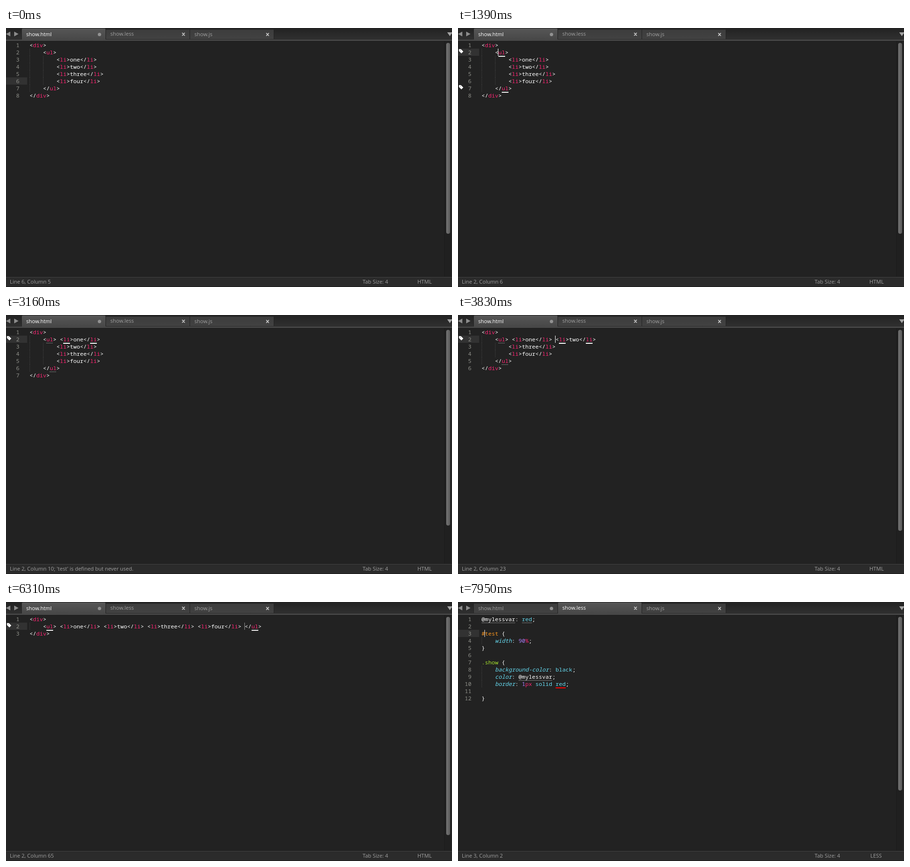
An HTML page that plays this animation: 928x540 px, repeating every 8 s.

```html
<!DOCTYPE html>
<html lang="en">
<head>
<meta charset="utf-8">
<title>Joining lines in an editor</title>
<style>
  html, body { margin: 0; width: 100%; height: 100%; overflow: hidden; background: #222; }
  #stage { position: relative; width: 928px; height: 540px; overflow: hidden; background: #222;
    font: 11px/15px "Open Sans", "Noto Sans", sans-serif; color: #a0a0a0; }
  #stage div { position: absolute; white-space: pre; }
  #chrome { position: absolute; left: 0; top: 0; }
  .tab { z-index: 1; }
  #stage .tab.on { color: #fff; }
  #code { left: 0; top: 28px; width: 912px; height: 490px; }
  #stage #code { color: #fff; font: 11.6667px/15px "Noto Sans Mono", "DejaVu Sans Mono", monospace; }
  .num { left: 0; width: 28px; text-align: right; color: #8f908a; }
  .row { left: 49px; }
  .here { left: 0; width: 44px; height: 15px; background: #323232; }
  .guide { width: 1px; height: 15px;
    background: repeating-linear-gradient(#444 0 1px, transparent 1px 2px); }
  .caret { width: 1px; height: 15px; background: #fff; }
  .dots { height: 1px; background: repeating-linear-gradient(90deg, #bbb 0 1px, transparent 1px 2px); }
  .tag { left: 2px; width: 9px; height: 9px; background: #fff;
    clip-path: polygon(0 0, 4px 0, 9px 5px, 5px 9px, 0 4px); }
  .tag::after { content: ""; position: absolute; left: 1.5px; top: 1.5px; width: 1.5px; height: 1.5px; background: #222; }
  .t { color: #f92672; } .c { color: #66d9ef; } .p { color: #66d9ef; font-style: italic; }
  .n { color: #ae81ff; } .o { color: #fd971f; } .g { color: #a6e22e; }
  #thumb { left: 916px; top: 31px; width: 8px; border-radius: 4px;
    background: linear-gradient(90deg, #747474, #5c5c5c); }
</style>
</head>
<body>
<div id="stage">
  <svg id="chrome" width="928" height="540">
    <defs>
      <linearGradient id="bar" x2="0" y2="1"><stop stop-color="#222"/><stop offset="1" stop-color="#303030"/></linearGradient>
      <linearGradient id="off" x2="0" y2="1"><stop stop-color="#3c3c3c"/><stop offset="1" stop-color="#424242"/></linearGradient>
      <linearGradient id="lit" x2="0" y2="1"><stop stop-color="#565656"/><stop offset="1" stop-color="#464646"/></linearGradient>
    </defs>
    <rect width="928" height="24" fill="url(#bar)"/>
    <rect y="23" width="928" height="4" fill="#464646"/>
    <rect y="23" width="928" height="1" fill="#2a2a2a"/>
    <rect y="27" width="928" height="1" fill="#1b1b1b"/>
    <g id="tabs"></g>
    <g fill="#8c8c8c">
      <path d="M0 12.5l9-5v10zM26 12.5l-9-5v10z"/>
      <path d="M918 9h11l-5.500 8z" fill="#a4a4a4"/>
      <circle cx="194.500" cy="13.500" r="3.500" fill="#929292"/>
    </g>
    <path d="M366.500 10l5.500 6m0-6l-5.500 6M541.500 10.500l5.500 6m0-6l-5.500 6" stroke="#ccc" stroke-width="1.800"/>
    <rect x="912" y="28" width="14" height="490" fill="#202020"/>
    <path d="M912.500 28v490" stroke="#1b1b1b"/>
    <path d="M926.500 28v490" stroke="#2c2c2c"/>
    <rect y="518" width="928" height="22" fill="#2b2b2b"/>
    <path d="M0 518.500h928M0 539.500h928" stroke="#1b1b1b"/>
    <path d="M0 519.500h928" stroke="#454545"/>
  </svg>
  <div class="tab" style="left:42px;top:5px">show.html</div>
  <div class="tab" style="left:217px;top:4px">show.less</div>
  <div class="tab" style="left:392px;top:5px">show.js</div>
  <div id="code"></div>
  <div id="thumb"></div>
  <div id="status" style="left:8px;top:521px"></div>
  <div style="left:742px;top:521px">Tab Size: 4</div>
  <div id="lang" style="top:521px"></div>
</div>
<script>
const LOOP = 8000, ROW = 15, COL = 7;
const $ = id => document.getElementById(id);
const words = ["one", "two", "three", "four"];

// time, joined lines (-1: stylesheet), caret line, column, caret opacity, marked tag
const steps = [
  [0, 0, 6, 5, 0, ""],
  [410, 0, 5, 5, 1, ""],
  [550, 0, 4, 5, 1, ""],
  [680, 0, 3, 5, 1, ""],
  [830, 0, 2, 5, 1, "ul"],
  [1240, 0, 2, 5, .5, "ul"],
  [1390, 0, 2, 6, 1, "ul"],
  [1670, 0, 2, 7, 1, "ul"],
  [2060, 0, 2, 7, .5, "ul"],
  [2200, 0, 2, 7, 0, "ul"],
  [2610, 1, 2, 10, 1, "ul"],
  [2890, 1, 2, 10, 1, "one"],
  [3020, 1, 2, 10, .5, "one"],
  [3160, 1, 2, 10, 0, "one"],
  [3680, 2, 2, 23, 1, "one"],
  [3820, 2, 2, 23, 1, "two"],
  [3950, 3, 2, 36, 1, "three"],
  [4250, 4, 2, 51, 1, "four"],
  [4540, 4, 2, 51, .5, "four"],
  [4690, 4, 2, 51, 0, "four"],
  [5230, 4, 2, 51, .5, "four"],
  [5360, 4, 2, 51, 1, "four"],
  [5640, 4, 2, 51, .5, "four"],
  [5750, 4, 2, 51, 0, "four"],
  [5880, 5, 2, 65, 1, "four"],
  [6310, 5, 2, 65, .5, "ul"],
  [6460, 5, 2, 65, .25, "ul"],
  [6580, 5, 2, 65, 0, "ul"],
  [6980, 5, 2, 65, 1, "ul"],
  [7400, 5, 2, 65, 0, "ul"],
  [7670, -1, 3, 2, 1, ""],
  [7950, -1, 3, 2, .85, ""]
];

// [x:text] marks a run of colour class x
const less = [
  "@mylessvar: [c:red];", "", "[o:#test] {", "    [p:width]: [n:90][t:%];", "}", "",
  "[g:.show] {", "    [p:background-color]: [c:black];", "    [p:color]: @mylessvar;",
  "    [p:border]: [n:1][t:px] [c:solid] [c:red];", "", "}"
];

function markup(joins) {
  const parts = ["<ul>", ...words.map(w => `<li>${w}</li>`), "</ul>"];
  const rest = parts.slice(joins + 1).map(p => (p === "</ul>" ? "    " : "        ") + p);
  return ["<div>", "    " + parts.slice(0, joins + 1).join(" "), ...rest, "</div>"];
}

const paintHtml = s => s.replace(/<(\/?)(\w+)>/g, '&lt;$1<span class="t">$2</span>&gt;');
const paintLess = s => s.replace(/\[(\w):([^\]]+)\]/g, '<span class="$1">$2</span>');
const box = (cls, css, text = "") => `<div class="${cls}" style="${css}">${text}</div>`;
const under = (row, col, len) =>
  `left:${49 + col * COL}px;top:${(row + 1) * ROW}px;width:${len * COL}px;`;
const line = (row, col, len, h, color) =>
  box("", under(row, col, len) + `height:${h}px;background:${color}`);

// row and column of both names of a tag pair
function ends(rows, name) {
  const find = (s, skip) => {
    const r = rows.findIndex(x => x.includes(s));
    return [r, rows[r].indexOf(s) + skip];
  };
  if (name === "ul") return [find("<ul>", 1), find("</ul>", 2)];
  const open = `<li>${name}`;
  return [find(open, 1), find(open + "</li>", open.length + 2)];
}

function marks(rows, name) {
  if (!name) return "";
  const spots = ends(rows, name);
  let out = spots.map(([r, c]) => line(r, c, 2, 2, "#fff")).join("");
  out += ends(rows, "ul").map(([r, c]) => box("dots", under(r, c, 2))).join("");
  for (const r of new Set(spots.map(s => s[0]))) out += box("tag", `top:${r * ROW + 1}px`);
  return out;
}

function drawTabs(active) {
  $("tabs").innerHTML = [0, 1, 2].map(i => {
    const x = 33 + i * 175, on = i === active, base = on ? 27 : 23;
    return `<path d="M${x} ${base}V3q0-2 2-2h170q2 0 2 2V${base}z" fill="url(#${on ? "lit" : "off"})"/>` +
      `<path d="M${x - .5} 3v20M${x + 174.5} 3v20" stroke="#222"/>` +
      (on ? "" : `<path d="M${x} 2h174" stroke="#242424" stroke-width="3"/>`);
  }).join("");
  document.querySelectorAll(".tab").forEach((t, i) => t.classList.toggle("on", i === active));
}

function draw([, joins, row, col, alpha, name]) {
  const css = joins < 0, rows = css ? less : markup(joins);
  let out = box("here", `top:${(row - 1) * ROW}px`);
  rows.forEach((s, i) => {
    const top = `top:${i * ROW}px`;
    const depth = s.match(/^ */)[0].length / 4;
    for (let k = 0; k < depth; k++) out += box("guide", `left:${49 + k * 28}px;${top}`);
    out += box("num", top, i + 1) + box("row", top, css ? paintLess(s) : paintHtml(s));
  });
  if (css) {
    out += line(0, 0, 10, 1, "#777") + line(0, 12, 3, 1, "#777") +
      line(8, 11, 10, 1, "#777") + line(9, 22, 3, 2, "#f00");
  } else {
    out += marks(rows, name);
  }
  out += box("caret", `left:${48 + (col - 1) * COL}px;top:${(row - 1) * ROW}px;opacity:${alpha}`);
  $("code").innerHTML = out;
  $("thumb").style.height = Math.round(483 * 491 / (491 + ROW * (rows.length - 1))) + "px";
  $("status").textContent = `Line ${row}, Column ${col}` +
    (joins === 1 ? "; 'test' is defined but never used." : "");
  $("lang").textContent = css ? "LESS" : "HTML";
  $("lang").style.left = css ? "858px" : "856px";
  drawTabs(css ? 1 : 0);
}

let shown;
function tick() {
  const t = performance.now() % LOOP;
  const step = steps.findLast(s => s[0] <= t);
  if (step !== shown) draw(shown = step);
  requestAnimationFrame(tick);
}
tick();
</script>
</body>
</html>
```
